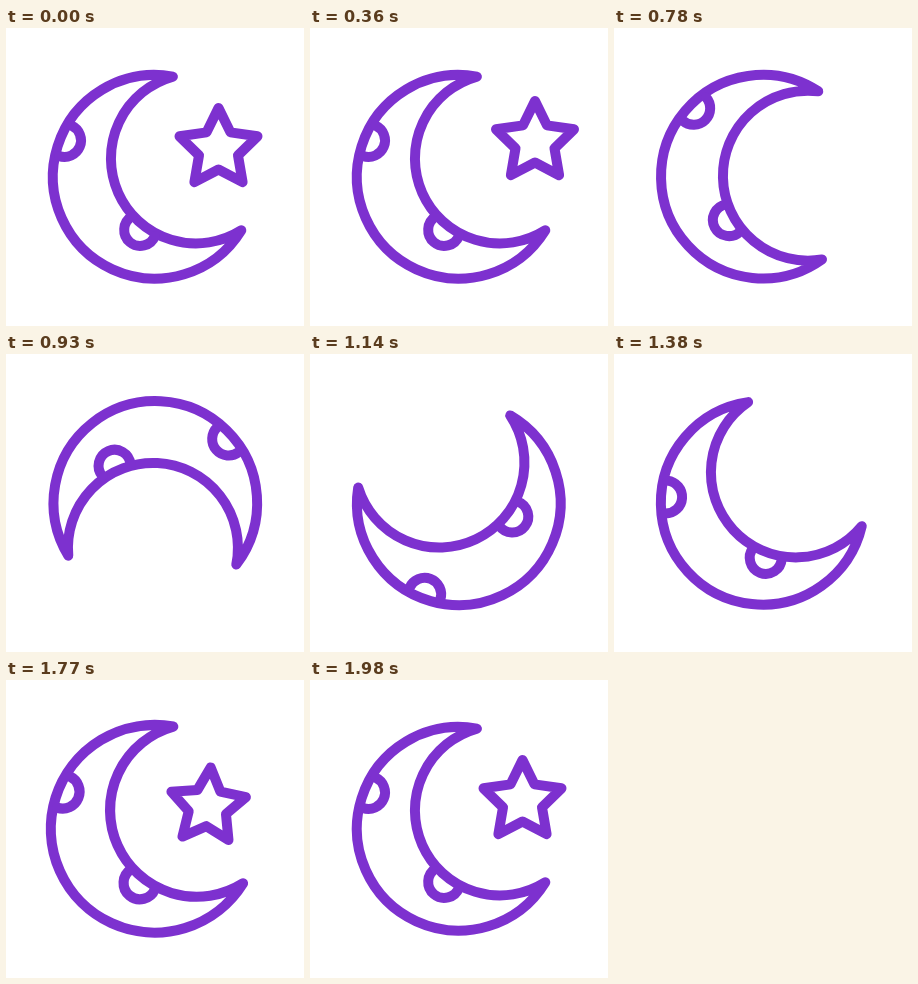
Write an HTML page that moves like this. It is 298 by 298 pixels and loops after 2.25 s.

```html
<!DOCTYPE html>
<html lang="en">
<head>
<meta charset="utf-8">
<title>Moon and star</title>
<style>
  html, body { margin: 0; width: 100%; height: 100%; overflow: hidden; background: #fff; }
  svg { display: block; width: 100vw; height: 100vh; }
  path {
    fill: #fff;
    stroke: #7d31cf;
    stroke-width: 10;
    stroke-linecap: round;
    stroke-linejoin: round;
  }
  .crater { fill: none; }

  #moon, #star { animation-duration: 2250ms; animation-iteration-count: infinite; animation-timing-function: linear; }
  #moon { transform-origin: 149px 149px; animation-name: spin, pulse; --ease: cubic-bezier(.37, 0, .63, 1); }
  #star { transform-origin: 0 0; animation-name: move, turn, size; }
  #star path { vector-effect: non-scaling-stroke; }

  /* Moon: recoil when the star hits, one full turn, then spring back and swell */
  @keyframes spin {
    0%, 22.222% { rotate: 0deg; animation-timing-function: cubic-bezier(.37, 0, .63, 1); }
    27.333% { rotate: -18.5deg; animation-timing-function: cubic-bezier(.37, 0, .63, 1); }
    60.667%, 61.333% { rotate: 341.5deg; animation-timing-function: cubic-bezier(.37, 0, .63, 1); }
    66.667%, 100% { rotate: 360deg; }
  }
  @keyframes pulse {
    0%, 61.333% { scale: 1; animation-timing-function: cubic-bezier(.37, 0, .63, 1); }
    66.667% { scale: 1.05; animation-timing-function: cubic-bezier(.37, 0, .63, 1); }
    88%, 100% { scale: 1; }
  }

  /* Star: lean out, dive behind the moon, come back */
  @keyframes move {
    0%, 8% { translate: 212.5px 121px; animation-timing-function: ease-in-out; }
    16% { translate: 225px 114px; animation-timing-function: cubic-bezier(.37, 0, .63, 1); }
    31.111% { translate: 90px 192px; animation-timing-function: step-end; }
    66.667% { translate: 86.5px 186.6px; animation-timing-function: cubic-bezier(.33, 1, .68, 1); }
    88%, 100% { translate: 212.5px 121px; }
  }
  @keyframes turn {
    0%, 16% { rotate: 0deg; animation-timing-function: cubic-bezier(.37, 0, .63, 1); }
    31.111% { rotate: 53deg; animation-timing-function: step-end; }
    66.667% { rotate: 49deg; animation-timing-function: cubic-bezier(.33, 1, .68, 1); }
    88%, 100% { rotate: 0deg; }
  }
  @keyframes size {
    0%, 16% { scale: 1; animation-timing-function: cubic-bezier(.32, 0, .67, 0); }
    31.111% { scale: .37; animation-timing-function: step-end; }
    66.667% { scale: .5; animation-timing-function: cubic-bezier(.33, 1, .68, 1); }
    88%, 100% { scale: 1; }
  }
  #star path { animation: hide 2250ms infinite step-end; }
  @keyframes hide {
    0%, 66.667% { visibility: visible; }
    31.111% { visibility: hidden; }
  }
</style>
</head>
<body>
<svg viewBox="0 0 298 298">
  <g id="star">
    <path d="M0-41 12-16.6 39-12.7 19.5 6.3 24.1 33.2 0 20.5-24.1 33.2-19.5 6.3-39-12.7-12-16.6Z"/>
  </g>
  <g id="moon">
    <path d="M166.9 48.6A101.8 101.8 0 1 0 235.3 202.3A85 85 0 1 1 166.9 48.6Z"/>
    <path class="crater" d="M65.5 97.5A16.5 16.5 0 0 1 53 128"/>
    <path class="crater" d="M125.5 188.5A16 16 0 1 0 149 208"/>
  </g>
</svg>
</body>
</html>
```
